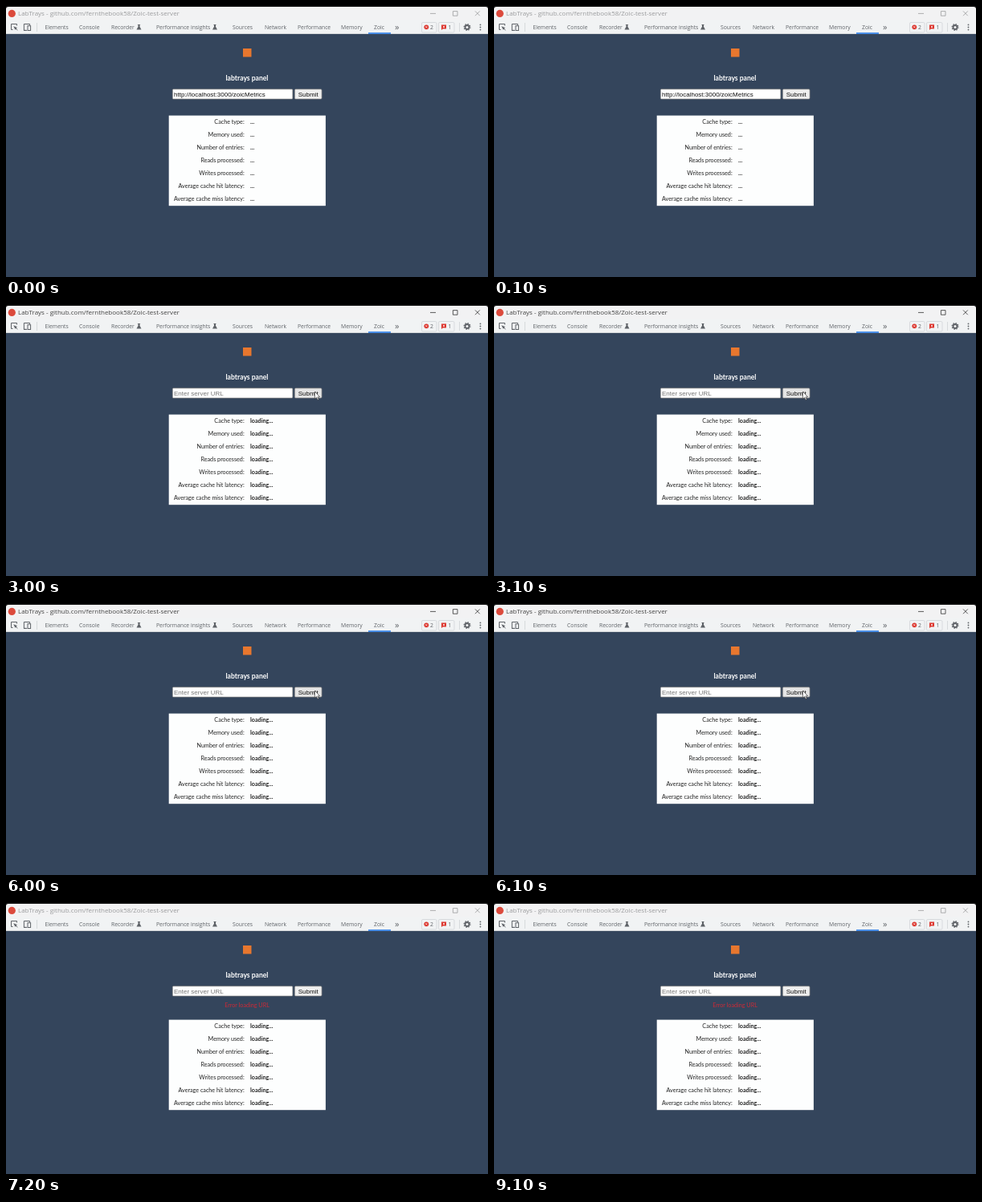
Animation of 600 by 338 pixels, one loop 9600 ms. Source, as an HTML page:

```html
<!DOCTYPE html>
<html lang="en">
<head>
<meta charset="utf-8">
<title>Cache metrics panel</title>
<style>
html, body { margin: 0; width: 100%; height: 100%; overflow: hidden; background: #34455c; }
svg { display: block; width: 100%; height: 100%; }
.ui { font: 6.8px "Open Sans", "Noto Sans", sans-serif; fill: #5f6368; }
.title { font-size: 8px; }
.form { font: 8px "Liberation Sans", Arial, sans-serif; }
.panel { font: 7.2px Lato, sans-serif; fill: #222; }
.bold { font-weight: 700; }
.line { fill: none; stroke: #5f6368; }
</style>
</head>
<body>
<svg viewBox="0 0 600 338">
  <rect width="600" height="338" fill="#34455c"/>
  <rect width="600" height="6" fill="#111"/>
  <path d="M0 19V4q0-3 3-3H597q3 0 3 3V19z" fill="#f2f2f3"/>
  <rect y="18" width="600" height="17" fill="#f1f3f4"/>
  <path d="M0 34.5H600" stroke="#cacdd1" stroke-width=".7"/>

  <!-- window bar -->
  <circle cx="7.3" cy="9.4" r="4.6" fill="#dc4a3c"/>
  <text id="title" class="ui title" x="15" y="12.2">LabTrays - github.com/fernthebook58/Zoic-test-server</text>
  <path id="controls" class="line" stroke-width=".8" d="M528 9.4h7M556.4 6.6h5.6v5.6h-5.6zM584 6.4l5.8 5.8m0-5.8l-5.8 5.8"/>

  <!-- toolbar -->
  <g id="tabs" class="ui"></g>
  <g class="line">
    <path d="M8.5 29.5H6.5V22.5H13.5V24.5"/>
    <path d="M9.3 25.2l5 2-2 .8-.8 2z" fill="#5f6368" stroke="none"/>
    <path d="M12 28l2.3 2.3"/>
    <path d="M25 30.4H22.4V22.5H29.6V24M22 30.4h4"/>
    <rect x="27" y="24.7" width="3.6" height="5.8"/>
    <path d="M38.5 21v11M564.5 21v11" stroke="#ccced1" stroke-width=".7"/>
    <circle cx="574" cy="26.5" r="2.5" stroke-width="1.8"/>
    <circle cx="574" cy="26.5" r="3.9" stroke-width="1.2" stroke-dasharray="1.53"/>
  </g>
  <g fill="#5f6368">
    <circle cx="590.5" cy="23.4" r=".9"/><circle cx="590.5" cy="26.5" r=".9"/><circle cx="590.5" cy="29.6" r=".9"/>
  </g>
  <path d="M451 34H479" stroke="#1a73e8" stroke-width="1.5"/>
  <g fill="none" stroke="#cdd0d4" stroke-width=".7">
    <rect x="517.5" y="20.5" width="18.5" height="12.5" rx="1.5"/>
    <rect x="538.5" y="20.5" width="19.5" height="12.5" rx="1.5"/>
  </g>
  <circle cx="523.3" cy="26.3" r="2.9" fill="#dc362e"/>
  <path d="M542 23.5h6v5h-4.2l-1.8 1.6z" fill="#dc362e"/>
  <path d="M522.2 25.2l2.2 2.2m0-2.2l-2.2 2.2M543.9 24.9l2.2 2.2m0-2.2l-2.2 2.2" stroke="#fff" stroke-width=".7"/>
  <text class="ui" x="528" y="29">2</text>
  <text class="ui" x="550.5" y="29">1</text>

  <!-- page -->
  <rect x="295" y="53" width="10.5" height="10.5" fill="#e8772e"/>
  <text class="panel bold" x="300" y="93" text-anchor="middle" style="font-size:8.6px;fill:#fff">labtrays panel</text>
  <g stroke="#767676" stroke-width=".7">
    <rect x="207.3" y="103.7" width="149.6" height="12.4" rx="1" fill="#fff"/>
    <rect id="button" x="359.3" y="103.7" width="33.8" height="12.4" rx="1.3"/>
  </g>
  <text id="url" class="form" x="209" y="112.7"></text>
  <text class="form" x="376.2" y="112.7" text-anchor="middle" fill="#111">Submit</text>
  <text id="error" class="panel" x="300" y="130.3" text-anchor="middle" style="fill:#cc2a36">Error loading URL</text>
  <g id="card" class="panel">
    <rect x="202.7" y="136.6" width="195.2" height="112.6" fill="#fdfefe"/>
  </g>
  <path id="cursor" d="M384.4 108v9.2l2.1-1.9 1.4 3.2 1.4-.6-1.4-3.1h2.8z" fill="#fff" stroke="#222" stroke-width=".6"/>
</svg>
<script>
const LOOP = 9600, SUBMIT = 2900, FAIL = 7000;
const $ = id => document.getElementById(id);

function add(parent, tag, attrs, text = "") {
  const el = document.createElementNS("http://www.w3.org/2000/svg", tag);
  for (const key in attrs) el.setAttribute(key, attrs[key]);
  el.textContent = text;
  return parent.appendChild(el);
}

const tabs = {
  Elements: 48.5, Console: 91, Recorder: 131, "Performance insights": 187, Sources: 282,
  Network: 322, Performance: 363, Memory: 417, Zoic: 458
};
for (const name in tabs) add($("tabs"), "text", { x: tabs[name], y: 28.8 }, name);
add($("tabs"), "text", { x: 484, y: 29.5, "font-size": 11 }, "»");
for (const x of [165.5, 260])
  add($("tabs"), "path", { d: `M${x - 1.6} 23h3.2v.8h-.6v2l2 3.7h-6l2-3.7v-2h-.6z` });

const labels = ["Cache type", "Memory used", "Number of entries", "Reads processed",
  "Writes processed", "Average cache hit latency", "Average cache miss latency"];
const values = labels.map((label, i) => {
  const y = 147 + i * 16.05;
  add($("card"), "text", { x: 296.7, y, "text-anchor": "end" }, label + ":");
  return add($("card"), "text", { x: 304, y, class: "bold" });
});

const show = (id, on) => $(id).setAttribute("visibility", on ? "visible" : "hidden");

function draw(now) {
  const t = now % LOOP;
  const sent = t >= SUBMIT, failed = t >= FAIL, active = sent && !failed;
  $("title").style.fill = active ? "#444" : "#9b9c9e";
  $("controls").style.stroke = active ? "#333" : "#9b9c9e";
  $("button").setAttribute("fill", active ? "#e5e5e5" : "#efefef");
  $("url").textContent = sent ? "Enter server URL" : "http://localhost:3000/zoicMetrics";
  $("url").setAttribute("fill", sent ? "#757575" : "#111");
  $("card").setAttribute("transform", `translate(0 ${failed ? 9 : 0})`);
  for (const value of values) value.textContent = sent ? "loading..." : "...";
  show("cursor", active);
  show("error", failed);
}

const start = performance.now();
function tick() {
  draw(performance.now() - start);
  requestAnimationFrame(tick);
}
tick();
</script>
</body>
</html>
```
